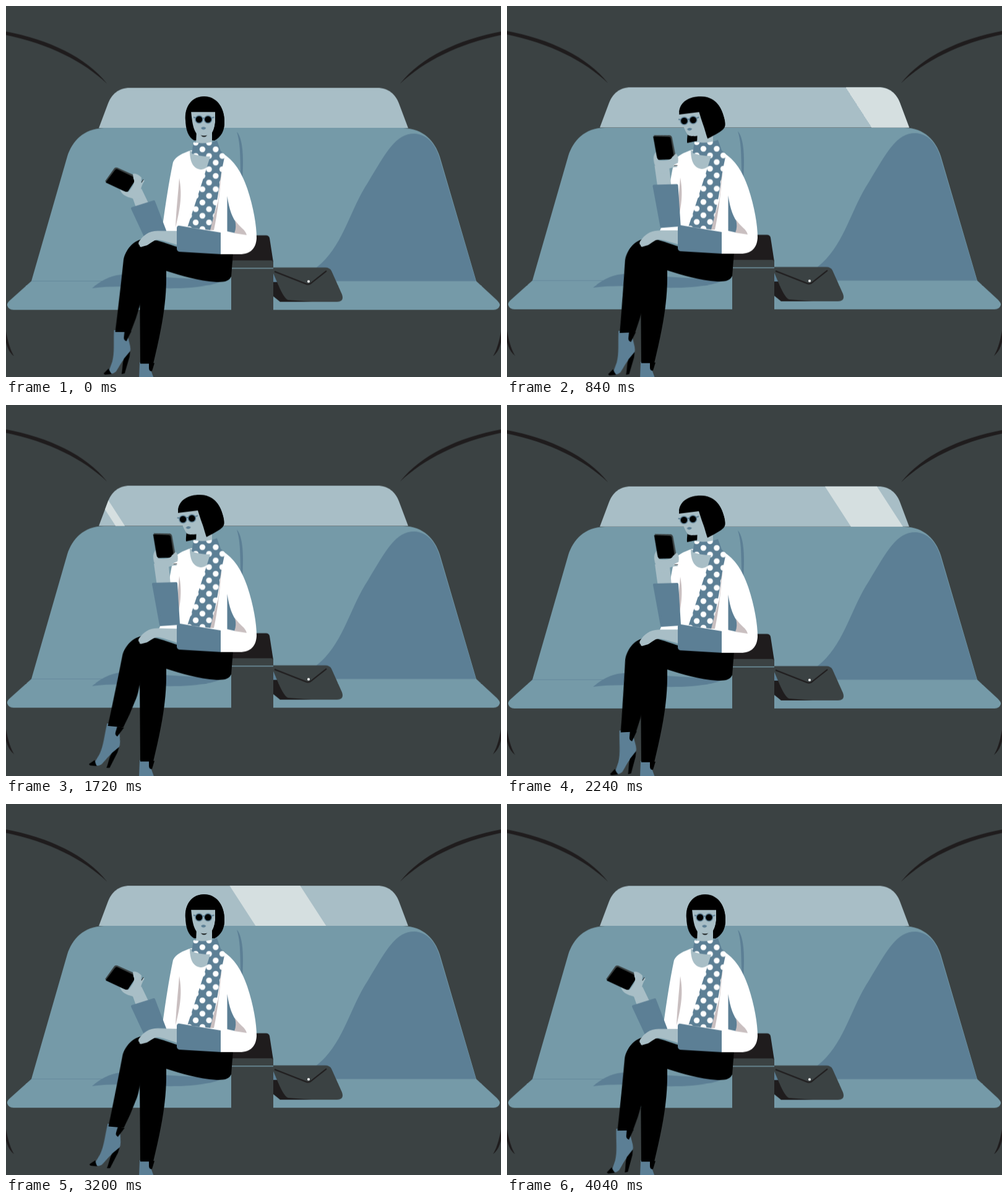
Animation, 800 px wide and 600 px high, one loop 4080 ms. Source, as an HTML page without scripts:

```html
<!DOCTYPE html>
<html lang="en">
<head>
<meta charset="utf-8">
<title>Back seat</title>
<style>
html, body { margin: 0; width: 100%; height: 100%; overflow: hidden; background: #3b4243; }
svg { display: block; width: 100vw; height: 100vh; }

.bg { fill: #3b4243; }
.ink { fill: #1f1c1d; }
.seat { fill: #759aa8; }
.shade { fill: #5c7f95; }
.pale { fill: #a8bec6; }
.glint { fill: #d5dfe0; }
.white { fill: #fff; }
.fold { fill: #c9bfc0; }

/* car and passing light */
.bob { animation: bob 4.08s ease-in-out infinite; }
.lights { animation: lights 4.08s linear infinite; }
@keyframes bob {
  0%, 16.7%, 33.3%, 50%, 82.5%, 100% { transform: translateY(.4px); }
  8.3%, 25%, 41.7% { transform: translateY(-1.5px); }
  58% { transform: translateY(-.6px); }
  70.6% { transform: translateY(-.4px); }
}
@keyframes lights { to { transform: translateX(-3423px); } }

/* crossed leg */
.swing { animation: swing 1.36s ease-in-out -.98s infinite; }
.shin { --a: 5.3deg; --b: -3.8deg; transform-origin: 240px 390px; }
.foot { --a: 5.8deg; --b: -1.6deg; transform-origin: 188px 528px; animation-delay: -.85s; }
.rest { --a: 1.8deg; --b: -.6deg; transform-origin: 277px 376px; }
@keyframes swing {
  0%, 100% { transform: rotate(var(--a)); }
  48% { transform: rotate(var(--b)); }
}

/* look at the phone and back */
.look { animation: 4.08s ease-in-out infinite; }
.phone { animation-name: phone; transform-origin: 268.5px 321px; }
.wrist { animation-name: wrist; }
.cuff { animation-name: cuff; stroke: #5c7f95; stroke-width: 4; stroke-linejoin: round; }
.back { animation-name: back; }
.face { animation-name: face; }
.hair { animation-name: hair; }
.eyes { animation-name: eyes; transform-origin: 319px 183px; }
@keyframes phone {
  0%, 1%, 77.5%, 100% { transform: translate(0, 0) rotate(0deg); }
  22.5%, 56.9% { transform: translate(.5px, -1.2px) rotate(55.5deg); }
}
@keyframes wrist {
  0%, 1%, 77.5%, 100% { d: path("M204 308L211 328L231 320L219 295Z"); }
  22.5%, 56.9% { d: path("M239 258L244 294L266 292L263 262Z"); }
}
@keyframes cuff {
  0%, 1%, 77.5%, 100% { d: path("M204 327L239 316L257 363L224 370Z"); }
  22.5%, 56.9% { d: path("M238 291L275 290L279 355L250 357Z"); }
}
@keyframes back {
  0%, 1%, 77.5%, 100% { d: path("M290 182C290 160 302 146 320 146C338 146 352 162 353 184C354 200 347 212 337 217L304 217C295 212 290 200 290 182Z"); }
  22.5%, 56.9% { d: path("M278 172C279 155 295 147 313 147C334 147 346 160 351 182C354 195 350 198 324 215L291 222C290 205 300 190 278 172Z"); }
}
@keyframes face {
  0%, 1%, 77.5%, 100% { d: path("M299 169L338 169L338 188C337 200 333 204 332 207C326 214 314 214 309 207C303 200 301 190 299 169Z"); }
  22.5%, 56.9% { d: path("M278 173L311 169L318 190C321 198 322 204 322 208C316 208 300 214 292 209C286 200 283 190 278 173Z"); }
}
@keyframes hair {
  0%, 1%, 77.5%, 100% { d: path("M290 185C288 160 302 146 320 146C340 146 352 162 353 184C354 202 347 212 336 217C333 212 332 206 334 203C338 195 339 185 338 171L299 171L290 185Z"); }
  22.5%, 56.9% { d: path("M278 175C279 155 295 147 313 147C334 147 347 162 352 186C354 198 353 200 324 215C321 206 319 198 317 193C314 185 312 178 310 172L278 176L278 175Z"); }
}
@keyframes eyes {
  0%, 1%, 77.5%, 100% { transform: translate(0, 0) rotate(0deg); }
  22.5%, 56.9% { transform: translate(-26px, 2.6px) rotate(-6deg); }
}
</style>
</head>
<body>
<svg viewBox="0 0 800 600">
  <defs>
    <path id="pane" d="M150 197L165 157C171 142 182 132 200 132H600C618 132 629 142 635 157L650 197Z"/>
    <clipPath id="glass"><use href="#pane"/></clipPath>
    <pattern id="dots" x="312" y="226" width="21.5" height="21.5" patternUnits="userSpaceOnUse">
      <rect class="shade" width="21.5" height="21.5"/>
      <circle class="white" cx="5.4" cy="5.4" r="4.7"/>
      <circle class="white" cx="16.1" cy="16.1" r="4.7"/>
    </pattern>
    <g id="trim">
      <path d="M-2 40.500C70 54 130 83 163 125C125 89 70 61 -2 46Z"/>
      <path d="M-1 520Q4 552 13 566Q2 558 -1 538Z"/>
    </g>
  </defs>

  <rect class="bg" width="800" height="600"/>

  <g class="bob">
    <g class="ink">
      <use href="#trim"/>
      <use href="#trim" transform="matrix(-1 0 0 1 800 0)"/>
    </g>

    <use class="pale" href="#pane"/>
    <g clip-path="url(#glass)">
      <g class="lights">
        <g class="glint" transform="translate(0 132) skewX(32.9)">
          <rect x="1253" width="114" height="66"/>
          <rect x="1579" width="15" height="66"/>
          <rect x="2394" width="84" height="66"/>
          <rect x="3047" width="114" height="66"/>
          <rect x="3373" width="15" height="66"/>
        </g>
      </g>
    </g>

    <!-- seat -->
    <path class="seat" d="M41 444.500L99 243C107 218 125 198 158 197H642C675 198 693 218 701 243L760 444.500L793 475Q799 481 798 484Q796 491 788 491H12Q4 491 2 484Q1 480 7 475Z"/>
    <path class="shade" d="M500 424C545 390 555 330 585 285C615 235 630 206 660 206C680 207 693 222 700 243L759.500 444.500H500Z"/>
    <path class="shade" d="M373 203C384 215 384 250 382 282C376 270 382 230 373 203Z"/>
    <path d="M41 444.500H190" stroke="#5c7f95" stroke-width=".6"/>
    <path class="seat" d="M432 444.500H530V480H432Z"/>
    <path class="shade" d="M139 456C160 438 178 434 190 434L350 444C330 454 290 457 250 456C210 453 170 452 139 456Z"/>

    <!-- bag and armrest -->
    <path class="bg" d="M432 422.500H516Q523 422.500 526 428L543 466Q547 478 535 478H445L432 469Z"/>
    <path class="shade" d="M432 432L438 446H432Z"/>
    <path class="ink" d="M432 446H438Q449 473 456 475L494 478H443L432 469Z"/>
    <path d="M434 429L485 449Q490 451 494 447L518 428" fill="none" stroke="#1f1c1d" stroke-width="2"/>
    <circle class="white" cx="489" cy="445" r="2.100"/>
    <rect class="bg" x="364" y="423" width="68" height="180"/>
    <path class="ink" d="M364 370.500H420Q425 370.500 426 375L432 414H364Z"/>
    <path class="bg" d="M364 424V415Q364 411 368 411H428Q432 411 432 415V424Z"/>
    <rect class="seat" x="364" y="423" width="68" height="1.400"/>

    <!-- legs -->
    <path class="shade" d="M216 576H235L234 588L239 602H215Z"/>
    <path d="M231 577H240L236 590Q231 591 231 585Z"/>
    <path d="M206 396C210 384 222 378 240 378C252 380 265 386 280 390L367 398L364 437C360 446 350 446 340 446C310 444 285 436 259 428V440C259 480 252 520 238 578H217L216 440Z"/>
    <g class="swing shin">
      <g class="swing foot">
        <path class="shade" d="M175 524H195L201 550Q203 560 196 566C188 572 184 582 178 591Q172 596 165 594L172 575C176 560 174 545 175 524Z"/>
        <path d="M158 594L166 586Q168 591 171 595L160 596Z"/>
        <path d="M201 558L200 567L192 594L187 595C189 585 188 577 191 570Z"/>
        <path d="M192 526H203L195 542Q190 540 191 535Z"/>
      </g>
      <path d="M190 410C193 394 206 379 220 377C238 376 250 390 250 400L223 440Q222 470 217 483Q211 505 202 527H177C181 495 187 440 190 410Z"/>
    </g>

    <!-- body -->
    <path class="white" d="M299 233C285 238 275 242 270 252C263 285 258 320 254 348L247 364H300L345 390L347 401H375C395 402 404 392 405 375C405 355 400 325 390 295C380 265 365 245 345 235Z"/>
    <path class="shade" d="M357.500 307C361 330 366 343 374 352L371 367L357.500 364Z"/>
    <path class="fold" d="M370 346C378 358 387 361 389 370L369 367Q373 358 370 346Z"/>
    <path class="fold" d="M280 278C285 305 282 325 274 358C275 330 278 305 280 278Z"/>
    <path class="fold" d="M350 246L343 315L329 362H336Q345 320 350 246Z"/>
    <path class="pale" d="M297 234C297 255 305 264 316 264C325 263 331 255 333 240Z"/>

    <!-- head -->
    <path class="look back"/>
    <path class="pale" d="M308 200H333V224H307Z"/>
    <path class="pale look face"/>
    <g class="look eyes">
      <path d="M303 179.500L308 181M331 181L336.500 179.500M317 181H322" fill="none" stroke="#5c7f95" stroke-width="2"/>
      <g stroke="#5c7f95" stroke-width="1.400">
        <circle cx="312" cy="183" r="6"/>
        <circle cx="326.500" cy="183" r="6"/>
      </g>
      <path class="shade" d="M315 197Q319 193 323.500 197Q319 202 315 197Z"/>
      <path d="M314.500 208.500Q320 210.500 325.500 208.500Q320 214 314.500 208.500Z"/>
    </g>
    <path class="look hair"/>

    <path fill="url(#dots)" d="M303 220Q322 224 341 217L347 234L354 240Q348 265 345 290Q340 325 330 362L293 358Q314 295 330 243Q312 243 300 238Z"/>

    <!-- raised arm -->
    <path class="pale look wrist"/>
    <g class="look phone">
      <path class="bg" d="M160 283L175 262Q177 260 180 261L211 275L197 300Z"/>
      <path d="M161 285L176 265Q178 262 181 264L206 276L208 283L198 298Q196 301 193 300Z"/>
      <path class="pale" d="M184 296C187 305 194 308 205 311L214 312L220 303C216 297 219 292 221 287L224 282L222 281L218 286L219 277C215 273 210 270 205 271L206 279C209 283 206 291 198 300Q192 301 184 296Z"/>
      <path d="M219 285L222 280" stroke="#1f1c1d"/>
    </g>
    <path class="shade look cuff"/>

    <!-- resting arm -->
    <path class="pale swing rest" d="M280 363.500H245C230 364 222 371 215 381Q213 385 216 387Q216 391 221 389L228 387C236 382 240 378 245 378C256 379 266 383 280 387Z"/>
    <path class="shade" d="M276 358Q277 354 281 355L347 366V401L280 397Q276 396 276 392Z"/>
  </g>
</svg>
</body>
</html>
```
